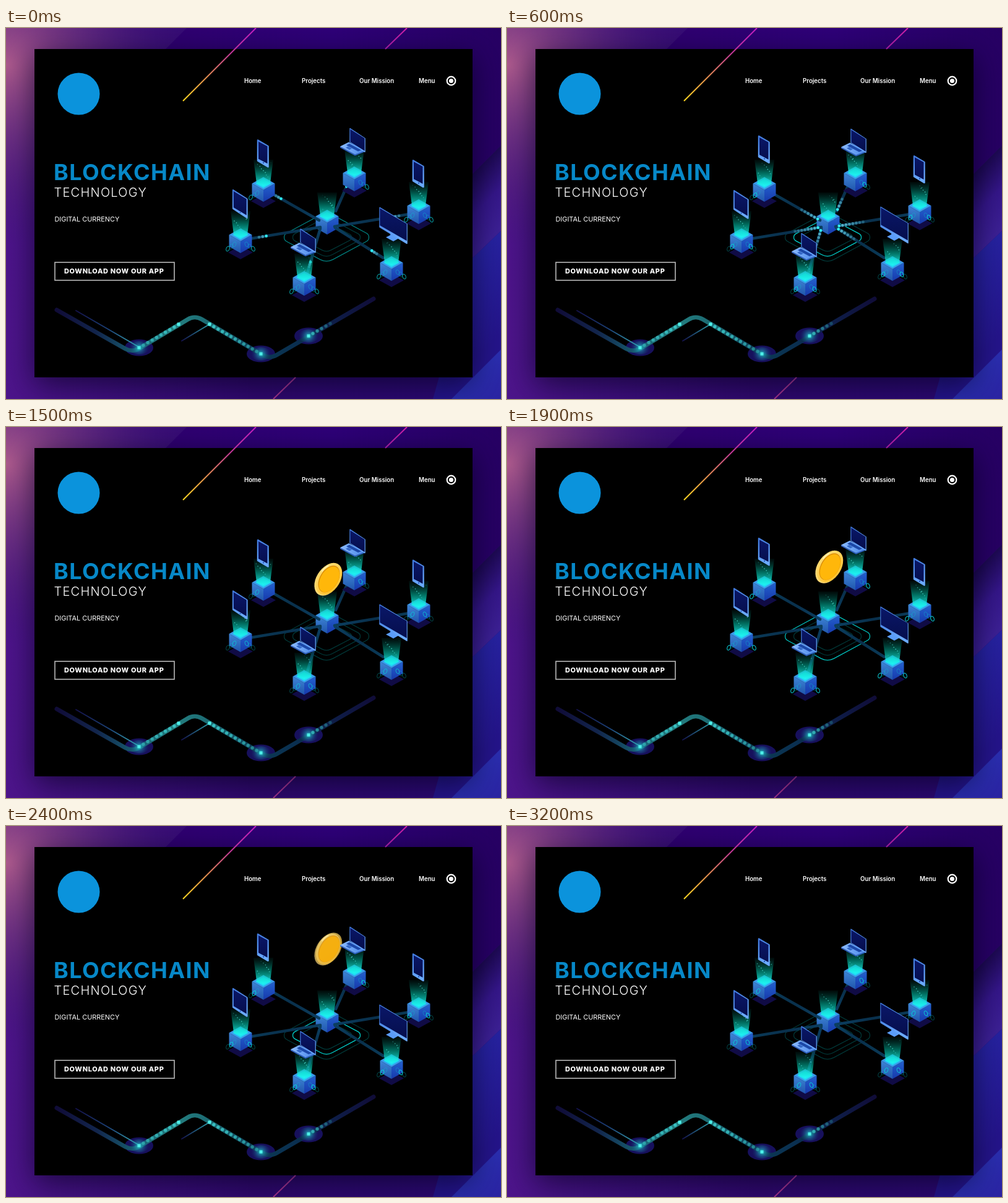
An HTML page with a canvas for the animation above (3300 ms loop, 800 by 600 pixels).

```html
<!DOCTYPE html>
<html lang="en">
<head>
<meta charset="utf-8">
<title>Blockchain Technology</title>
<style>
html, body { margin: 0; width: 100%; height: 100%; overflow: hidden; background: #2a0a6c; }
canvas, svg { position: absolute; left: 0; top: 0; width: 800px; height: 600px; }
text { font-family: Inter, "Open Sans", sans-serif; fill: #fff; }
.nav { font-size: 9.7px; font-weight: 600; }
</style>
</head>
<body>
<canvas id="stage" width="800" height="600"></canvas>
<svg viewBox="0 0 800 600">
  <g class="nav">
    <text x="385" y="89">Home</text>
    <text x="478" y="89">Projects</text>
    <text x="571" y="89">Our Mission</text>
    <text x="667" y="89">Menu</text>
  </g>
  <text x="77" y="246" font-size="36" font-weight="700" letter-spacing="1.4" style="fill:#0788c8">BLOCKCHAIN</text>
  <text x="77.5" y="273" font-size="20" font-weight="300" letter-spacing="1.25">TECHNOLOGY</text>
  <text x="78.5" y="313" font-size="10.9">DIGITAL CURRENCY</text>
  <text x="94" y="397" font-size="11" font-weight="800" letter-spacing=".65">DOWNLOAD NOW OUR APP</text>
</svg>
<script>
const LOOP = 3300, STEP = 100, CYCLE = 1800;
const stage = document.getElementById('stage').getContext('2d');
const backdrop = document.createElement('canvas');
backdrop.width = 800;
backdrop.height = 600;
let c = backdrop.getContext('2d');

const clamp = v => Math.max(0, Math.min(1, v));

function grad(x0, y0, x1, y1, ...colors) {
  const g = c.createLinearGradient(x0, y0, x1, y1);
  colors.forEach((col, i) => g.addColorStop(i / (colors.length - 1), col));
  return g;
}
function glow(x, y, r, inner, outer) {
  const g = c.createRadialGradient(x, y, 0, x, y, r);
  g.addColorStop(0, inner);
  g.addColorStop(1, outer);
  return g;
}
function poly(fill, ...p) {
  c.beginPath();
  for (let i = 0; i < p.length; i += 2) c.lineTo(p[i], p[i + 1]);
  c.closePath();
  c.fillStyle = fill;
  c.fill();
}
function line(x0, y0, x1, y1, width, color) {
  c.beginPath();
  c.moveTo(x0, y0);
  c.lineTo(x1, y1);
  c.lineWidth = width;
  c.strokeStyle = color;
  c.stroke();
}
function oval(x, y, rx, ry, turn, fill) {
  c.beginPath();
  c.ellipse(x, y, rx, ry, turn, 0, 7);
  c.fillStyle = fill;
  c.fill();
}
const disc = (x, y, r, fill) => oval(x, y, r, r, 0, fill);

// ---- still parts ----
function paintBackground() {
  c.fillStyle = grad(0, 0, 800, 0, '#4d148a', '#3c0e7c', '#30086e', '#2c0870', '#2a0872');
  c.fillRect(0, 0, 800, 600);
  c.fillStyle = glow(0, 60, 290, '#ad5a8c', 'rgba(62,26,104,0)');
  c.fillRect(0, 0, 300, 380);
  poly(grad(258, 0, 800, 0, '#2f0070', '#2e0078', '#260062'), 292, 0, 800, 0, 800, 190, 600, 390, 258, 34);
  // bands run at 45 degrees, each shaded across its width
  poly(grad(777, 213, 845, 281, '#1c0850', '#341688', '#3c2094'), 800, 190, 754, 236, 754, 372, 800, 328);
  poly(grad(777, 350, 860, 433, '#2622a0', '#24148a'), 800, 328, 754, 372, 690, 600, 800, 600);
  poly(grad(760, 560, 800, 600, '#2a2eb0', '#2a22a0'), 800, 520, 720, 600, 800, 600);

  c.shadowColor = 'rgba(0,0,20,.62)';
  c.shadowBlur = 46;
  c.shadowOffsetY = 11;
  c.fillStyle = '#000';
  c.fillRect(46, 34, 708, 531);
  c.shadowColor = 'transparent';

  line(404, 0, 286, 118, 2, grad(404, 0, 286, 118, '#c01cc0', '#c03498', '#e08a50', '#ffd820'));
  line(648, 0, 613, 34, 2, grad(648, 0, 613, 34, '#d020a8', '#9a1c98'));
  line(468, 565, 432, 600, 2, grad(468, 565, 432, 600, '#6c2468', '#9a2e80'));
}

function trackDots(x0, y0, x1, y1, n, a0, a1) {
  for (let i = 0; i < n; i++) {
    const k = i / (n - 1);
    c.globalAlpha = a0 + (a1 - a0) * k;
    disc(x0 + (x1 - x0) * k, y0 + (y1 - y0) * k, 2.7, '#3cc8c8');
  }
  c.globalAlpha = 1;
}

function paintTrack() {
  const nodes = [[215, 517], [412, 527], [489, 498]];
  nodes.forEach(([x, y]) => oval(x, y, 23, 13.5, 0, '#17105c'));
  c.lineCap = 'round';
  c.beginPath();
  c.moveTo(82, 456);
  c.arcTo(204, 525, 305, 464.5, 22);
  c.arcTo(305, 464.5, 426, 535.5, 22);
  c.arcTo(426, 535.5, 596, 437, 22);
  c.lineTo(594, 438);
  c.lineWidth = 7;
  c.strokeStyle = grad(82, 0, 596, 0, '#100c38', '#12254c', '#175f70', '#247f80', '#1a6670', '#0b3a54', '#0a2f50', '#0e1d48', '#100c38');
  c.stroke();
  line(113, 457, 215, 516, 2, grad(113, 457, 215, 516, '#14124c', '#1c4078', '#38b0b8'));
  line(284, 506, 329, 479, 2, grad(284, 506, 329, 479, '#14124c', '#2fa0ac'));
  nodes.forEach(([x, y]) => {
    oval(x, y, 17, 11, 0, glow(x, y, 16, 'rgba(40,210,215,.85)', 'rgba(20,60,120,0)'));
  });
  trackDots(222, 513, 279, 479.5, 9, .55, .95);
  trackDots(329, 479, 405, 523, 12, .95, .5);
  trackDots(496, 494, 524, 478, 5, .75, .25);
  [[279, 479], [329, 479], ...nodes].forEach(([x, y]) => {
    c.fillStyle = '#4ef0ea';
    c.fillRect(x - 2.5, y - 2.5, 5, 5);
  });
  c.lineCap = 'butt';
}

function paintPage() {
  disc(117.5, 106.5, 34, '#0b93dc');
  c.lineWidth = 1.6;
  c.strokeStyle = '#b8b8b8';
  c.strokeRect(79, 379, 193, 29);
  c.beginPath();
  c.arc(719.5, 85.5, 6.8, 0, 7);
  c.lineWidth = 2.2;
  c.strokeStyle = '#fff';
  c.stroke();
  disc(719.5, 85.5, 3.6, '#fff');
}

// ---- network ----
// x, top corner of each cube, sides carrying rings
const cubes = [
  [416, 241, [-1]], [563, 224, [1]], [667, 277, [-1, 1]],
  [379, 324, [-1, 1]], [623, 369, [-1, 1]], [482, 393, [-1, 1]]
];
const links = [
  [425, 265, 506, 311], [556, 244, 533, 296], [652, 301, 531, 321],
  [393, 341, 508, 322], [610, 372, 532, 323], [487, 396, 508, 324]
];

// brightness of a pulse that peaks once per cycle
function pulse(t, peak, spread) {
  let d = Math.abs(t - peak) % CYCLE;
  d = Math.min(d, CYCLE - d);
  return Math.exp(-d * d / (spread * spread));
}
const bob = (t, low) => -Math.cos((t - low) / CYCLE * 2 * Math.PI);

function platform(w, h, r, light) {
  const x = 518, y = 338.5, side = r * .35;
  c.beginPath();
  c.moveTo(x - w / 2, y - h / 2);
  c.arcTo(x, y - h, x + w, y, r);
  c.arcTo(x + w, y, x, y + h, side);
  c.arcTo(x, y + h, x - w, y, r);
  c.arcTo(x - w, y, x, y - h, side);
  c.closePath();
  c.lineWidth = 1.2;
  c.strokeStyle = `rgba(0,${170 + 50 * light},${170 + 45 * light},${.33 + .65 * light})`;
  c.stroke();
}

function cube(x, y, shadow) {
  if (shadow) poly('#100b45', x - 20, y + 39, x, y + 28, x + 20, y + 39, x, y + 50);
  poly(grad(x, y + 10, x, y + 40, '#3f86d8', '#2056ac'), x - 18.5, y + 10.5, x, y + 21, x, y + 40, x - 18.5, y + 29.5);
  poly(grad(x, y + 10, x, y + 40, '#2462d0', '#173aac'), x + 18.5, y + 10.5, x, y + 21, x, y + 40, x + 18.5, y + 29.5);
  poly('#3a98ea', x, y, x + 18.5, y + 10.5, x, y + 21, x - 18.5, y + 10.5);
  poly('#1fdcf4', x, y + 3, x + 13, y + 10.5, x, y + 18, x - 13, y + 10.5);
}

function beam(x, y, t, seed) {
  poly(grad(x, y - 28, x, y + 14, 'rgba(0,120,105,.08)', 'rgba(0,190,165,.55)', 'rgba(30,245,240,.95)'),
    x - 16, y - 28, x + 16, y - 28, x + 11, y + 10, x, y + 15, x - 11, y + 10);
  for (let i = 0; i < 9; i++) {
    const rise = (i * .37 + seed * .23 + t / CYCLE) % 1;
    const side = (i * .618 + seed * .31) % 1 - .5;
    c.globalAlpha = Math.sin(rise * Math.PI) * .85;
    c.fillStyle = '#5cf4e4';
    c.fillRect(x + side * (18 + 8 * rise), y + 2 - 27 * rise, 1.3, 1.3);
  }
  c.globalAlpha = 1;
}

function sideRings(x, y, sides, t) {
  for (const s of sides) {
    [[10, 26, 1250, 330], [15, 29.5, 620, 230], [20.5, 33, 150, 230]].forEach(([dx, dy, peak, spread]) => {
      c.beginPath();
      c.ellipse(x + s * dx, y + dy, 2.6, 4.1, -s * .4, 0, 7);
      c.lineWidth = 1.1;
      c.strokeStyle = `rgba(10,205,215,${.3 + .65 * pulse(t, peak, spread)})`;
      c.stroke();
    });
  }
}

function flow([x0, y0, x1, y1], t) {
  if (t > 900) return;
  const head = .24 + .76 * t / 640;
  const tail = .1 + .22 * Math.min(1, t / 600);
  const len = Math.hypot(x1 - x0, y1 - y0);
  const n = Math.max(3, Math.round(tail * len / 5.5) + 1);
  for (let i = 0; i < n; i++) {
    const k = head - tail * i / (n - 1);
    if (k < 0 || k > 1.01) continue;
    c.globalAlpha = 1 - .75 * i / n;
    disc(x0 + (x1 - x0) * k, y0 + (y1 - y0) * k, 2.4, i ? '#58bcd0' : '#30ecf0');
  }
  c.globalAlpha = 1;
}

// slab seen from the side: width, height, slope of the top edge
function slab(x, y, w, h, slope, rim, foot, round) {
  const d = w * slope;
  c.lineJoin = 'round';
  c.beginPath();
  [[1, 1], [w - 1, d + 1], [w - 1, d + h - 1], [1, h - 1]].forEach(([a, b]) => c.lineTo(x + a, y + b));
  c.closePath();
  c.fillStyle = c.strokeStyle = grad(x, y, x + w, y + h, '#3f78dc', '#6aaaff');
  c.lineWidth = round;
  c.fill();
  c.stroke();
  const e = rim * slope;
  poly(grad(x, y, x, y + h + d, '#0a1768', '#050d4a'),
    x + rim, y + rim + e, x + w - rim, y + d + rim - e,
    x + w - rim, y + d + h - foot - e, x + rim, y + h - foot + e);
}

function phone(x, y) {
  slab(x, y, 18.5, 35, .53, 2, 5, 2.5);
  disc(x + 10, y + 37.5, 1, '#123a9c');
}
function tablet(x, y) {
  slab(x, y, 24.5, 32, .6, 1.8, 4, 2.2);
  disc(x + 12.5, y + 37.5, .9, '#123a9c');
}
function laptop(x, y) {
  poly('#2f62c8', x - 15, y + 30, x + 9, y + 43, x + 24, y + 37, x + 24, y + 39, x + 9, y + 45, x - 15, y + 32);
  poly(grad(x - 15, y, x + 24, y, '#8cbcff', '#4a88ea'), x - 15, y + 30, x - 1, y + 23, x + 25, y + 37, x + 9, y + 43);
  poly('#1c48a8', x - 5, y + 28, x, y + 25.5, x + 19, y + 36, x + 14, y + 38);
  poly('#3468c8', x - 6, y + 32, x - 2, y + 30, x + 4, y + 33.5, x, y + 35.5);
  slab(x, y, 26, 23.5, .62, 1.4, 1.6, 1.5);
}
function monitor(x, y) {
  poly('#3f7ee0', x + 18, y + 42, x + 27, y + 47, x + 27, y + 52, x + 18, y + 51);
  poly('#5a9cf8', x + 11, y + 49, x + 20, y + 44.5, x + 32, y + 50.5, x + 23, y + 55.5);
  slab(x, y, 46, 33.5, .58, 1.3, 4.5, 1.5);
}

function coin(t) {
  const u = t - 1000;
  const alpha = clamp((t - 930) / 400) * clamp((2720 - t) / 450);
  if (!alpha) return;
  const y = 269 - .043 * u - .000005 * u * u, turn = -1.03;
  c.globalAlpha = alpha;
  oval(519.6, y + .8, 28, 18.2, turn, '#ffd873');
  oval(522, y - .8, 28, 18.2, turn, grad(505, y - 20, 535, y + 20, '#ffe07a', '#ffc02a'));
  oval(522, y - .4, 23.7, 14.7, turn, '#d98c08');
  oval(522.4, y + .2, 22.8, 13.9, turn, '#ffb70a');
  // glint on the upper left rim
  c.beginPath();
  c.ellipse(522, y - .6, 26, 16.5, turn, -1.4, -.8);
  c.lineWidth = 1.8;
  c.strokeStyle = '#fff0b8';
  c.stroke();
  c.globalAlpha = 1;
}

function draw(t) {
  c.drawImage(backdrop, 0, 0);
  platform(77, 41.5, 22, pulse(t, 160, 200));
  platform(62, 33, 19, pulse(t, 600, 190));
  platform(47, 24.5, 16, pulse(t, 980, 190));
  cube(519, 294, false);
  beam(519, 294, t, 6);

  c.lineCap = 'round';
  links.forEach(([a, b, d, e]) => line(a, b, d, e, 4.6, grad(a, b, d, e, '#0a3a58', '#09304c', '#0b3e60')));
  c.lineCap = 'butt';
  links.forEach(l => flow(l, t));

  cubes.forEach(([x, y, sides], i) => {
    cube(x, y, true);
    sideRings(x, y, sides, t);
    beam(x, y, t, i);
  });
  coin(t);

  const a = bob(t, 650), b = bob(t, 250);
  phone(406, 178 + 4 * a);
  phone(657, 210.5 + 4.3 * a);
  laptop(555, 163.8 + 3.5 * b);
  tablet(366, 263.2 + 3.3 * b);
  laptop(475, 327 - 4.4 * a);
  monitor(603, 287.5 - 3 * b);
}

paintBackground();
paintTrack();
paintPage();
c = stage;

const start = performance.now();
function tick() {
  const t = (performance.now() - start) % LOOP;
  draw(Math.floor(t / STEP) * STEP);
  requestAnimationFrame(tick);
}
tick();
</script>
</body>
</html>
```
